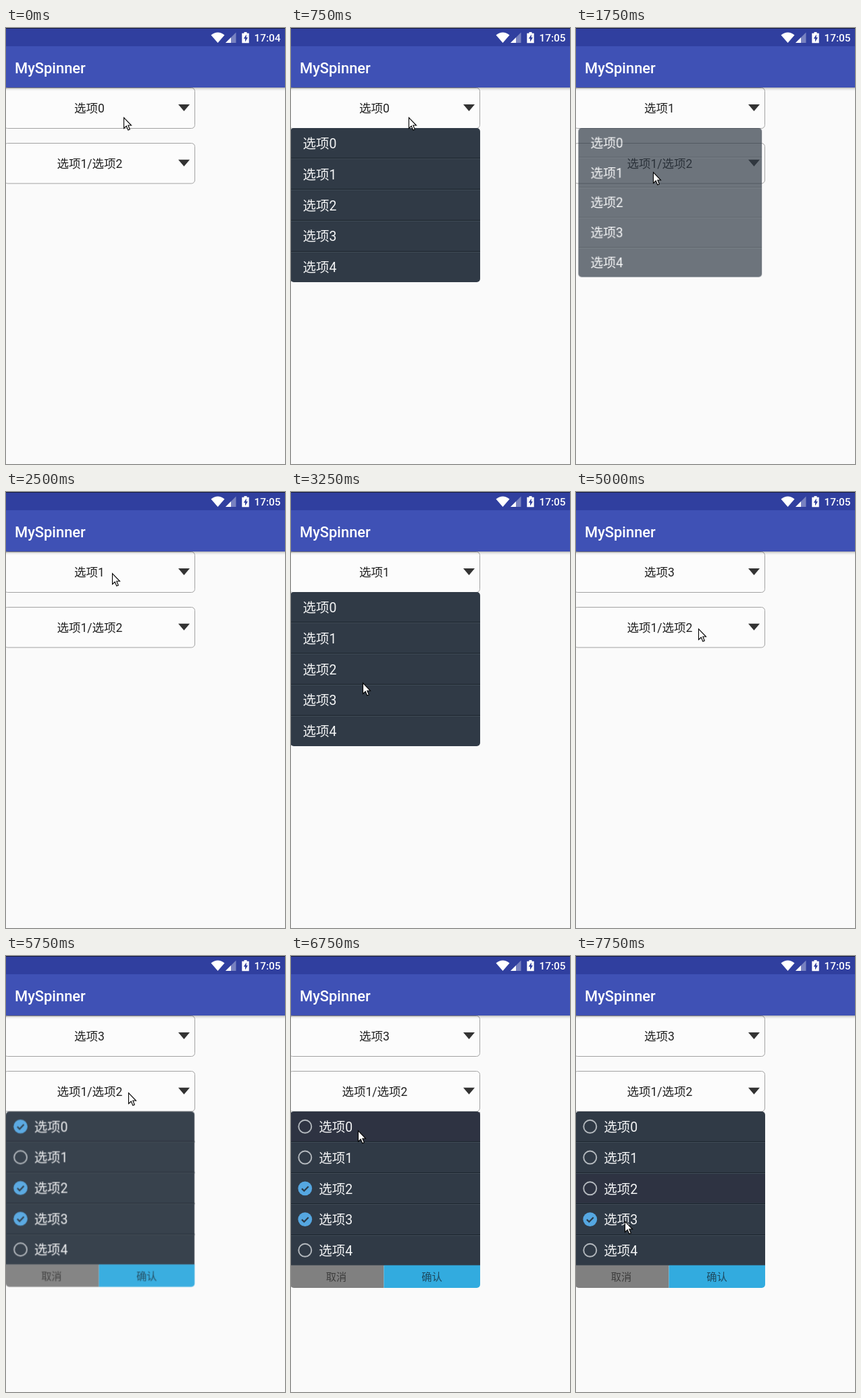
Write an HTML page that moves like this. It is 413 px wide and 645 px high and loops after 8 s.

```html
<!DOCTYPE html>
<html lang="zh-CN">
<head>
<meta charset="utf-8">
<title>MySpinner</title>
<style>
html, body { margin: 0; height: 100%; overflow: hidden; background: #fafafa; }
svg { display: block; width: 100vw; height: 100vh; }
text { font: 17.5px Roboto, "Noto Sans CJK SC", "Noto Sans CJK", sans-serif; fill: #222; white-space: pre; }
.title { font-size: 21.9px; font-weight: 500; fill: #fff; }
.clock { font-size: 15.3px; font-weight: 500; fill: #fff; }
.item { font-size: 19.5px; fill: #f4f5f6; }
.btn { font-size: 15.3px; text-anchor: middle; }
.box { fill: #fcfcfc; stroke: #a2a2a2; }
.arrow { fill: #333; }
.panel { fill: #303a46; }
.dark { stroke: #1b242d; }
.light { stroke: #414c57; }
.ring { fill: none; stroke: #b4b9be; stroke-width: 1.9; }
.disc { fill: #55a7e1; }
.tick { fill: none; stroke: #2c3a47; stroke-width: 2.2; }
.press { fill: #2d3040; opacity: 0; }

#single, #multi, #cursor, .clock, .label, .mark, .press { animation: 8s step-end infinite; }
#single { transform-origin: 134px 148px; animation-name: single; }
#multi { transform-origin: 134px 230px; animation-name: multi; }
#cursor { animation-name: cursor; }
#early { animation-name: early; }
#late { animation-name: late; }
#pick0 { animation-name: pick0; }
#pick1 { animation-name: pick1; }
#pick3 { animation-name: pick3; }
#on0 { animation-name: on0; }
#on2 { animation-name: on2; }
#off0 { animation-name: off0; }
#off2 { animation-name: off2; }
#press0 { animation-name: press0; }
#press2 { animation-name: press2; }

@keyframes single {
  0%, 28.125%, 56.25%, 100% { opacity: 0; transform: none; }
  9.375%, 40.625% { opacity: 1; transform: none; }
  21.875% { opacity: .7; transform: scale(.967); }
  25% { opacity: .2; transform: scale(.917); }
  37.5% { opacity: .7; transform: scale(.967); }
  53.125% { opacity: .04; transform: scale(.9); }
}
@keyframes multi {
  0%, 100% { opacity: 0; transform: none; }
  71.875% { opacity: .96; transform: scale(.9945); }
  75% { opacity: 1; transform: none; }
}
@keyframes cursor {
  0% { transform: translate(174px, 132px); }
  15.625% { transform: translate(128px, 188px); }
  18.75% { transform: translate(114px, 213px); }
  25% { transform: translate(130px, 180px); }
  28.125% { transform: translate(152px, 138px); }
  31.25% { transform: translate(157px, 120px); }
  37.5% { transform: translate(132px, 205px); }
  40.625% { transform: translate(106px, 282px); }
  43.75% { transform: translate(106px, 288px); }
  50% { transform: translate(108px, 295px); }
  56.25% { transform: translate(112px, 292px); }
  59.375% { transform: translate(152px, 236px); }
  62.5% { transform: translate(181px, 202px); }
  78.125% { transform: translate(107px, 249px); }
  81.25% { transform: translate(99px, 258px); }
  87.5% { transform: translate(88px, 298px); }
  90.625% { transform: translate(74px, 345px); }
  93.75% { transform: translate(72px, 348px); }
  96.875%, 100% { transform: translate(72px, 392px); }
}
@keyframes early { 0% { opacity: 1; } 9.375%, 100% { opacity: 0; } }
@keyframes late { 0% { opacity: 0; } 9.375%, 100% { opacity: 1; } }
@keyframes pick0 { 0% { opacity: 1; } 21.875%, 100% { opacity: 0; } }
@keyframes pick1 { 0%, 53.125%, 100% { opacity: 0; } 21.875% { opacity: 1; } }
@keyframes pick3 { 0% { opacity: 0; } 53.125%, 100% { opacity: 1; } }
@keyframes on0 { 0% { opacity: 1; } 84.375%, 100% { opacity: 0; } }
@keyframes off0 { 0% { opacity: 0; } 84.375%, 100% { opacity: 1; } }
@keyframes on2 { 0% { opacity: 1; } 90.625%, 100% { opacity: 0; } }
@keyframes off2 { 0% { opacity: 0; } 90.625%, 100% { opacity: 1; } }
@keyframes press0 { 0%, 87.5%, 100% { opacity: 0; } 84.375% { opacity: .6; } }
@keyframes press2 { 0% { opacity: 0; } 90.625%, 100% { opacity: .6; } }
</style>
</head>
<body>
<svg viewBox="0 0 413 645">
  <defs>
    <linearGradient id="shade" x2="0" y2="1">
      <stop offset="0" stop-opacity=".3"/>
      <stop offset=".4" stop-opacity=".1"/>
      <stop offset="1" stop-opacity="0"/>
    </linearGradient>
    <clipPath id="round"><rect x="-1" y="230" width="281" height="261" rx="5"/></clipPath>
  </defs>
  <rect width="413" height="645" fill="#fafafa"/>

  <rect class="box" x="-2.5" y="88.5" width="282" height="60" rx="5"/>
  <rect class="box" x="-2.5" y="170.5" width="282" height="59.5" rx="5"/>
  <path class="arrow" d="M255 113h17l-8.5 10zM255 194.700h17l-8.500 10z"/>
  <text class="label" id="pick0" x="101" y="125">选项0</text>
  <text class="label" id="pick1" x="101" y="125">选项1</text>
  <text class="label" id="pick3" x="101" y="125">选项3</text>
  <text x="75.500" y="207">选项1/选项2</text>

  <rect y="88" width="413" height="5" fill="url(#shade)"/>
  <rect width="413" height="88" fill="#3f51b5"/>
  <rect width="413" height="27" fill="#303f9f"/>
  <rect width="413" height="1" fill="#161c3c"/>
  <text class="title" x="13" y="66.500">MySpinner</text>
  <g fill="#fff">
    <path d="M303.500 10.500Q313.500 2.500 323.500 10.500L313.500 22z"/>
    <path d="M340.500 6.500V22H325z" opacity=".35"/>
    <path d="M333 14V22H325z"/>
    <path d="M352.500 6h4v1.700h3.200V22.300h-10.400V7.700h3.200z"/>
    <path d="M355.800 9.500l-4 6.200h2.200v4.800l4-6.500h-2.200z" fill="#303f9f"/>
  </g>
  <text class="clock" id="early" x="367.500" y="20">17:04</text>
  <text class="clock" id="late" x="367.500" y="20">17:05</text>

  <g id="single">
    <rect class="panel" x="-1" y="148" width="281" height="228" rx="5"/>
  </g>

  <g id="multi">
    <g clip-path="url(#round)">
      <rect class="panel" x="-1" y="230" width="281" height="228"/>
      <rect x="-1" y="457.500" width="138.500" height="34" fill="#808080"/>
      <rect x="137.500" y="457.500" width="143" height="34" fill="#32abdf"/>
    </g>
    <text class="btn" x="67" y="480" style="fill:#3c3c3c">取消</text>
    <text class="btn" x="208.500" y="480" style="fill:#1d4a60">确认</text>
  </g>

  <path id="cursor" d="M.5 .5V16.500L4.200 13 6.800 19 9.300 18 6.800 12H11.500Z" fill="#fff" stroke="#000" stroke-width="1.100"/>
</svg>
<script>
const pitch = 45.75;

function addRows(id, top, textX, mark) {
  let out = "";
  for (let i = 0; i < 5; i++) {
    const y = top + i * pitch;
    out += mark ? mark(i, y) : "";
    out += `<text class="item" x="${textX}" y="${y + 30}">选项${i}</text>`;
    if (i < 4) {
      const line = Math.round(y + 44.3) + .5;
      out += `<path class="dark" d="M0 ${line}H280"/><path class="light" d="M0 ${line + 1}H280"/>`;
    }
  }
  document.getElementById(id).insertAdjacentHTML("beforeend", out);
}

function checkMark(i, y) {
  const cy = y + 22.3;
  const ring = `<circle class="ring mark" id="off${i}" cx="20.800" cy="${cy}" r="9.500"/>`;
  const disc = `<g class="mark" id="on${i}"><circle class="disc" cx="20.800" cy="${cy}" r="10.400"/>` +
    `<path class="tick" d="M16 ${cy + .3}l3.400 3.400 6.400-6.600"/></g>`;
  const press = `<rect class="press" id="press${i}" y="${y + 1}" width="280" height="43"/>`;
  if (i === 3) return disc;
  return i % 2 || i === 4 ? ring : press + ring + disc;
}

addRows("single", 148, 17.5);
addRows("multi", 230, 41.2, checkMark);
</script>
</body>
</html>
```
